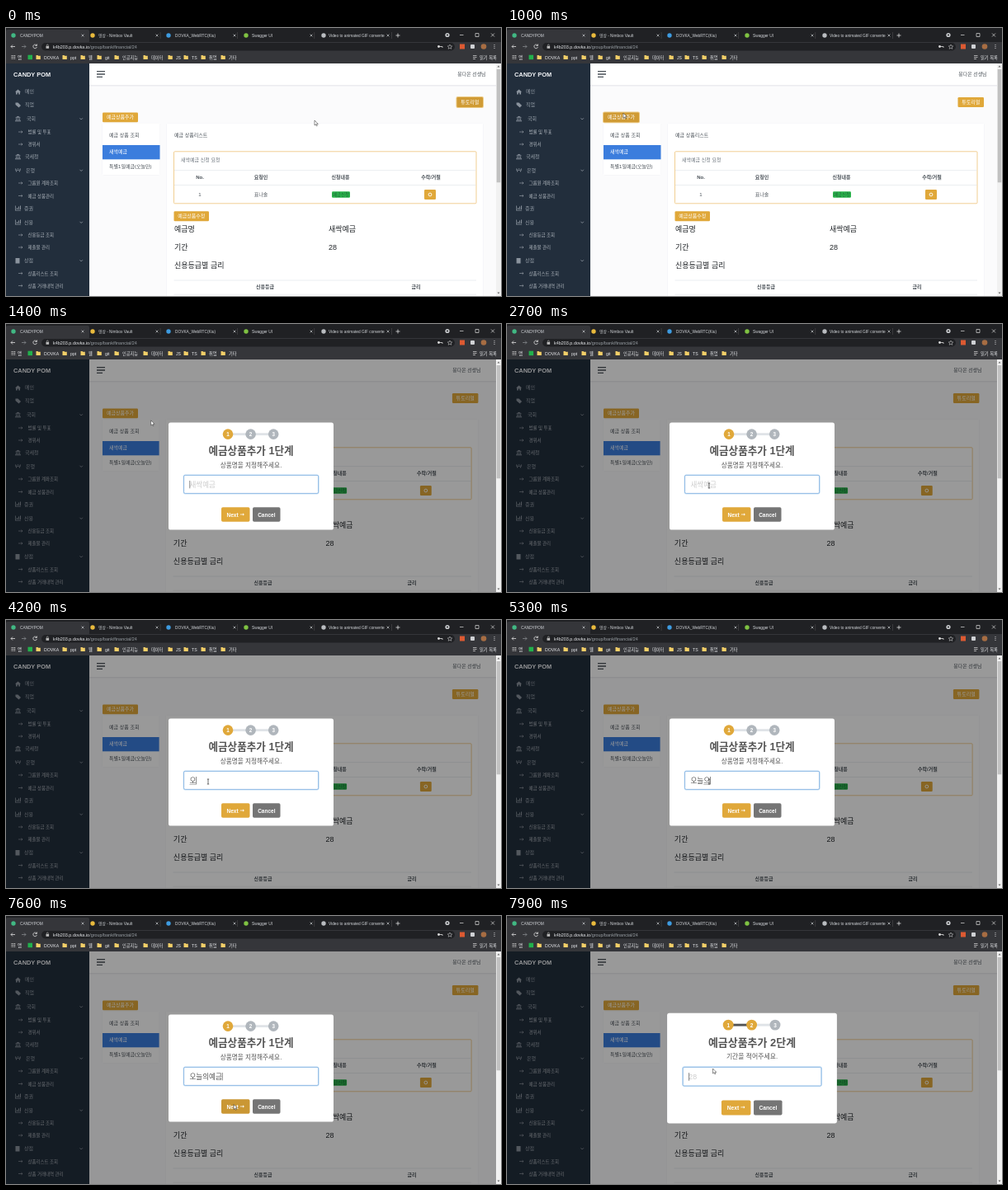
An HTML page that plays this animation: 600 px wide and 325 px high, repeating every 8000 ms.

```html
<!DOCTYPE html>
<html lang="ko">
<head>
<meta charset="utf-8">
<title>CANDYPOM</title>
<style>
  html, body { margin: 0; width: 100%; height: 100%; overflow: hidden; background: #000; }
  svg { display: block; width: 600px; height: 325px; }
  text { font-family: "Liberation Sans", "Noto Sans CJK KR", "Noto Sans CJK", sans-serif; dominant-baseline: central; white-space: pre; }
  .arrow { font-family: "DejaVu Sans", sans-serif; }
</style>
</head>
<body>
<svg id="stage" viewBox="0 0 600 325"></svg>
<script>
const GOLD = '#e0a83a', GOLD_DARK = '#d09b35', INK = '#495057', BAR = '#35363a', STRIP = '#202124';

const rect = (x, y, w, h, fill, extra = '') =>
  `<rect x="${x}" y="${y}" width="${w}" height="${h}" fill="${fill}" ${extra}/>`;
const circle = (x, y, r, fill) => `<circle cx="${x}" cy="${y}" r="${r}" fill="${fill}"/>`;
const path = (d, stroke, width = 0.8, fill = 'none') =>
  `<path d="${d}" stroke="${stroke}" stroke-width="${width}" fill="${fill}"/>`;
const label = (x, y, s, size, fill, anchor = 'start', weight = 400) =>
  `<text x="${x}" y="${y}" font-size="${size}" fill="${fill}" text-anchor="${anchor}" font-weight="${weight}">${s}</text>`;
const cross = (x, y, r, color) =>
  path(`M${x - r} ${y - r}l${2 * r} ${2 * r}M${x + r} ${y - r}l${-2 * r} ${2 * r}`, color, 0.7);

function browser() {
  const tabs = [
    [9, 17, 'CANDYPOM', '#41b883'],
    [105, 112, '영상 - Nimbox Vault', '#e8b93c'],
    [197, 205, 'DOVKA_WebRTC(Kiu)', '#3d9be0'],
    [291, 298, 'Swagger UI', '#7fc242'],
    [385, 391, 'Video to animated GIF converte', '#b9bcc0']
  ];
  let s = rect(0, 0, 600, 17, STRIP) + rect(0, 2, 101, 16, BAR, 'rx="2"') + rect(0, 17, 600, 26, BAR);
  tabs.forEach(([iconX, x, title, color], i) => {
    s += circle(iconX, 9, 2.7, color) + label(x, 9, title, 4.8, '#d3d6da');
    s += cross([93, 183, 277, 370, 463][i], 9, 1.4, '#c8cacd');
    if (i) s += rect(93.4 * (i + 1), 5, 0.5, 8, '#555');
  });
  s += path('M472.5 9h5M475 6.5v5', '#ddd') + circle(535, 8.5, 2.6, '#c9cbce') + circle(535, 8.5, 1, STRIP);
  s += path('M550 8.5h4.5M569 6.5h4v4h-4z', '#ddd', 0.7) + cross(590, 8.5, 2, '#ddd');

  s += path('M11 22.5H6m2-2l-2 2 2 2', '#ddd') + path('M19 22.5h5m-2-2l2 2-2 2', '#85888c');
  s += path('M37 21a2.3 2.3 0 1 0 .4 2M37.4 19.5v2h-2', '#ddd');
  s += rect(43, 18, 501, 9.5, STRIP, 'rx="4.7"');
  s += rect(48.5, 22, 3.6, 2.8, '#bbb') + path('M49.3 22v-1a1 1 0 0 1 2 0v1', '#bbb', 0.6);
  s += label(57, 22.7, 'k4b203.p.dovka.io<tspan fill="#9aa0a6">/group/bank/financial/24</tspan>', 5.45, '#e8eaed');
  s += circle(524.5, 22.5, 1.4, '#ddd') + path('M525 22.5h4v1.5', '#ddd');
  s += path('M538 20l.8 1.8 2 .2-1.5 1.3.5 2-1.8-1-1.8 1 .5-2-1.5-1.3 2-.2z', '#ddd', 0.5);
  s += rect(550, 19.5, 6, 6, '#dd5a32') + rect(563, 20, 5, 5, '#d0d2d5', 'rx="1"');
  s += circle(579, 22.5, 3.3, '#a76d43');
  for (const y of [20.5, 22.5, 24.5]) s += circle(592, y, 0.6, '#ddd');

  for (let i = 0; i < 9; i++) s += rect(6.5 + i % 3 * 1.8, 33 + Math.floor(i / 3) * 1.8, 1.1, 1.1, '#ccc');
  s += label(14, 35.5, '앱', 5.4, '#e8eaed') + rect(26.5, 32.7, 5.5, 5.5, '#22b14c');
  const folders = [[39, 'DOVKA'], [71, 'ppt'], [93, '웹'], [113, 'git'], [134, '인공지능'], [169, '데이터'],
    [199, 'JS'], [218, 'TS'], [239, '취업'], [263, '기타']];
  for (const [x, name] of folders)
    s += path(`M${x - 2.5} 33h2l.7.8h2.6v4.2h-5.3z`, 'none', 0, '#f3cf68') + label(x + 7, 35.5, name, 5.2, '#e8eaed');
  s += path('M566 33.5h4.5M566 35.5h4.5M566 37.5h3', '#ddd', 0.7) + label(574, 35.5, '읽기 목록', 5.3, '#e8eaed');
  return s;
}

function sidebar() {
  const home = 'M11 77.5l3.5-3 3.5 3h-1v3h-1.7v-2h-1.6v2H12v-3z';
  const tag = 'M11.5 90.5h3l3.5 3.5-2.5 2.5-4-3.5z';
  const bank = y => `M11 ${y - 1.2}l3.5-2 3.5 2zM12 ${y - .6}h1v2.4h-1zM14 ${y - .6}h1v2.4h-1zM16 ${y - .6}h1v2.4h-1zM11 ${y + 2.2}h7v1h-7z`;
  const chart = y => `M11 ${y - 3}h.8v5.2h6.2v.8h-7zM13 ${y - .5}h1v2h-1zM15 ${y - 2}h1v3.5h-1zM17 ${y - 3}h1v4.5h-1z`;
  const won = 'M11 170.5l1.6 4.5 1.4-4h1l1.4 4 1.6-4.5h-1l-.8 2.5-1-2.5h-1.4l-1 2.5-.8-2.5zM11 172h7v.8h-7z';
  const doc = 'M11.5 279h5v6.5h-5z';
  const groups = [
    [77, 23, '메인', home], [93, 23, '직업', tag], [110, 25, '국회', bank(110), 1],
    [156, 23, '국세청', bank(156)], [172.5, 24, '은행', won, 1],
    [218.5, 22, '증권', chart(218.5)], [235.5, 22, '신용', chart(235.5), 1], [282, 22, '상점', doc, 1]
  ];
  const links = [[126, '법률 및 투표'], [141, '경위서'], [188, '그룹원 계좌조회'], [203.5, '예금 상품관리'],
    [251, '신용등급 조회'], [266, '제출물 관리'], [297.5, '상품리스트 조회'], [312.5, '상품 거래내역 관리']];
  let s = rect(0, 43, 101, 282, '#222e3c') + label(9, 56.3, 'CANDY POM', 7.4, '#f5f7fa', 'start', 700);
  for (const [y, x, name, icon, open] of groups) {
    s += path(icon, 'none', 0, '#8a939d') + label(x, y, name, 6, '#9aa3ac');
    if (open) s += path(`M89.5 ${y - .7}l1.7 1.7 1.7-1.7`, '#a5adb5', 0.7);
  }
  for (const [y, name] of links)
    s += path(`M15 ${y}h5m-1.5-1.3l1.5 1.3-1.5 1.3`, '#9fa7af', 0.6) + label(26.5, y, name, 5.45, '#b0b7be');
  return s;
}

const goldButton = (x, y, w, h, name, focused) =>
  (focused ? rect(x - 1, y - 1, w + 2, h + 2, '#ecca86', 'rx="2"') : '') +
  rect(x, y, w, h, focused ? GOLD_DARK : GOLD, 'rx="1.3"') +
  label(x + w / 2, y + h / 2, name, 6, '#fff', 'middle');

// The layout narrows slightly while the dialog is open.
function page(narrow, focus) {
  const X = x => narrow ? 117 + (x - 117) * 0.987 : x;
  const box = (x1, y, x2, h, fill, extra) => rect(X(x1), y, X(x2) - X(x1), h, fill, extra);
  const word = (x, ...rest) => label(X(x), ...rest);
  let s = rect(101, 43, 493, 282, '#fbfbfc');
  s += rect(101, 69, 493, 1.5, '#ececf0') + rect(101, 43, 493, 26, '#fff');
  s += path('M110 52.6h10M110 56h10M110 59.4h7', INK, 1.3);
  s += word(581.5, 56, '봉다온 선생님', 5.9, INK, 'end');
  s += goldButton(X(546.5), 84, 31.5, 12, '튜토리얼', focus === 'tutorial');

  s += box(116.5, 115.5, 187, 63, '#f1f2f5', 'rx="2"') + box(117, 115.5, 186.5, 62.5, '#fff');
  s += goldButton(117, 102.6, 43, 11.7, '예금상품추가', focus === 'add');
  s += label(125, 129.5, '예금 상품 조회', 6, INK);
  s += box(117, 142, 186.5, 17.3, '#3b7ddd') + label(125, 150.3, '새싹예금', 6, '#fff');
  s += label(125, 168, '특별1일예금(오늘만)', 6, INK);

  s += box(194.5, 115, 578.5, 215, '#f1f2f5', 'rx="2"') + box(195, 115.5, 578, 215, '#fff');
  s += word(204, 129.5, '예금 상품리스트', 6, INK);
  s += box(203.5, 149.8, 570, 63, '#fff', 'stroke="#f0c987" stroke-width=".9" rx="1"');
  s += word(212, 160.3, '새싹예금 신청 요청', 6, '#6c757d');
  s += box(204, 172.5, 569.5, 0.6, '#dee2e6') + box(204, 190.3, 569.5, 0.6, '#dee2e6');
  for (const [x, name] of [[235, 'No.'], [309, '요청인'], [405.5, '신청내용'], [515, '수락/거절']])
    s += word(x, 181, name, 6, INK, 'middle', 700);
  s += word(235, 201.7, '1', 6, INK, 'middle') + word(309, 201.7, '표나솔', 6, INK, 'middle');
  s += box(395, 198.3, 417, 7.4, '#2bb54c', 'rx="1.3"') + word(406, 202, '예금신청', 5.4, '#1c6137', 'middle');
  s += box(507, 196, 521, 12, GOLD, 'rx="1.3"');
  s += `<circle cx="${X(514)}" cy="202" r="1.9" fill="none" stroke="#fff" stroke-width=".9"/>`;

  s += goldButton(X(203.5), 222.3, 42.5, 12, '예금상품수정');
  s += word(204, 243.5, '예금명', 9, '#212529') + word(391, 243.5, '새싹예금', 9, '#212529');
  s += word(204, 266, '기간', 9, '#212529') + word(391, 266, '28', 9, '#212529');
  s += word(204, 288, '신용등급별 금리', 9, '#212529');
  s += box(203.5, 305.7, 570, 0.6, '#dee2e6') + box(203.5, 322.8, 570, 0.6, '#dee2e6');
  s += word(314, 314, '신용등급', 6, INK, 'middle', 700) + word(497, 314, '금리', 6, INK, 'middle', 700);
  return s;
}

const scrollbar = rect(594, 43, 6, 282, '#f1f1f1') + rect(594.7, 50, 4.6, 137.3, '#c1c1c1') +
  path('M595.5 47.5l1.5-2 1.5 2z', 'none', 0, '#666') + path('M595.5 320.5l1.5 2 1.5-2z', 'none', 0, '#666');

const typing = [[3000, 'ㅇ'], [3300, ''], [4100, 'ㅇ'], [4200, '오'], [4900, '온'], [5000, '오느'], [5100, '오늘'],
  [5200, '오늘ㅇ'], [5300, '오늘으'], [5600, '오늘의'], [5900, '오늘의ㅇ'], [6100, '오늘의예'], [6200, '오늘의예그'], [6300, '오늘의예금']];
const OPEN = 1036, NEXT = 7748, CHAR = 7.87;

function inputText(t, step) {
  const edits = step === 1 ? [[1100, ''], [2200, ''], ...typing] : [[NEXT, '']];
  const [since, value] = edits.filter(e => e[0] <= t).pop() || [t, ''];
  const end = 222.5 + value.length * CHAR;
  let s = value ? label(222.5, 194.6, value, 8.55, '#545454')
                : label(222.5, 194.6, step === 1 ? '새싹예금' : '28', 8.55, '#ccc');
  if (value && t < 6300) s += rect(end - CHAR, 199.2, CHAR, 0.5, '#777');
  if ((t - since) % 1000 < 500) s += rect(end, 190, 0.7, 9.3, '#555');
  return s;
}

function dialog(t, step, hover) {
  const stops = [269, 296.6, 324.2];
  let s = rect(197, 119.6, 200, 130, '#fff', 'rx="2.6"');
  s += rect(269, 132.2, 27.6, 2.8, step > 1 ? '#545454' : '#dfe3e7') + rect(296.6, 132.2, 27.6, 2.8, '#dfe3e7');
  stops.forEach((x, i) => {
    s += circle(x, 133.6, 6.3, i < step ? GOLD : '#b0b6bc') + label(x, 133.6, i + 1, 6.3, '#fff', 'middle', 700);
  });
  s += label(297, 154, `예금상품추가 ${step}단계`, 12.6, '#545454', 'middle', 700);
  s += label(297, 171.2, step === 1 ? '상품명을 지정해주세요.' : '기간을 적어주세요.', 7.65, '#545454', 'middle');
  s += rect(215.6, 183.4, 163, 22, '#fff', 'rx="1.6" stroke="#c9e2f6" stroke-width="2"');
  s += rect(215.6, 183.4, 163, 22, '#fff', 'rx="1.6" stroke="#86b4e2" stroke-width=".9"');
  s += inputText(t, step);
  s += rect(261, 222.3, 34.5, 17.5, hover ? '#ca9734' : GOLD, 'rx="1.8"');
  s += label(278.2, 231, 'Next <tspan class="arrow">→</tspan>', 6.5, '#fff', 'middle', 700);
  s += rect(299, 222.3, 33.5, 17.5, '#757575', 'rx="1.8"') + label(315.8, 231, 'Cancel', 6.5, '#fff', 'middle', 700);
  return s;
}

// Piecewise linear lookup through [time, ...values] keys.
function track(keys, t, ease = p => p) {
  const i = keys.findIndex(k => k[0] > t);
  if (i < 0) return keys[keys.length - 1].slice(1);
  if (i === 0) return keys[0].slice(1);
  const a = keys[i - 1], b = keys[i], p = ease((t - a[0]) / (b[0] - a[0]));
  return a.slice(1).map((v, j) => v + (b[j + 1] - v) * p);
}

// CSS "ease": cubic-bezier(.25, .1, .25, 1)
function cssEase(x) {
  let lo = 0, hi = 1;
  const bez = (u, a, b) => 3 * u * (1 - u) ** 2 * a + 3 * u * u * (1 - u) * b + u ** 3;
  for (let i = 0; i < 20; i++) {
    const mid = (lo + hi) / 2;
    if (bez(mid, 0.25, 0.25) < x) lo = mid; else hi = mid;
  }
  return bez(lo, 0.1, 1);
}
const popScale = age => track([[0, 0.7], [135, 1.05], [240, 0.95], [300, 1]], age, cssEase)[0];

const pointerKeys = [[0, 374, 112], [300, 174, 107], [400, 174, 107], [900, 141, 103.5], [1100, 141, 103],
  [1300, 167, 107], [2200, 245, 196], [6900, 245, 196], [7500, 277, 229], [7700, 275, 228], [7900, 249.5, 185]];

function pointer(t) {
  const [x, y] = track(pointerKeys, t);
  const overInput = t > OPEN && t < NEXT && x > 215 && x < 379 && y > 183 && y < 206;
  return overInput
    ? path(`M${x - 1.2} ${y - 3}h2.4M${x} ${y - 3}v6M${x - 1.2} ${y + 3}h2.4`, '#333', 0.7)
    : path(`M${x} ${y}v6l1.4-1.2 1 2 .9-.4-.9-2h1.9z`, '#222', 0.5, '#fff');
}

const frameArt = browser() + sidebar();
const pages = { tutorial: page(false, 'tutorial'), add: page(false, 'add'), narrow: page(true) };

function render(t) {
  let s = frameArt + scrollbar;
  if (t < OPEN) {
    s += pages[t < 900 ? 'tutorial' : 'add'];
  } else {
    const step = t < NEXT ? 1 : 2;
    const scale = popScale(t - (step === 1 ? OPEN : NEXT));
    const [x, y] = track(pointerKeys, t);
    const hover = x > 261 && x < 296 && y > 222 && y < 240;
    s += pages.narrow + rect(0, 43, 594, 282, '#000', 'opacity=".4"');
    s += `<g transform="translate(297 184.6) scale(${scale}) translate(-297 -184.6)">${dialog(t, step, hover)}</g>`;
  }
  return s + pointer(t);
}

const stage = document.getElementById('stage');
const start = performance.now();
let shown = -1;
function tick() {
  const t = Math.floor((performance.now() - start) % 8000 / 100) * 100;
  if (t !== shown) stage.innerHTML = render(shown = t);
  requestAnimationFrame(tick);
}
tick();
</script>
</body>
</html>
```
